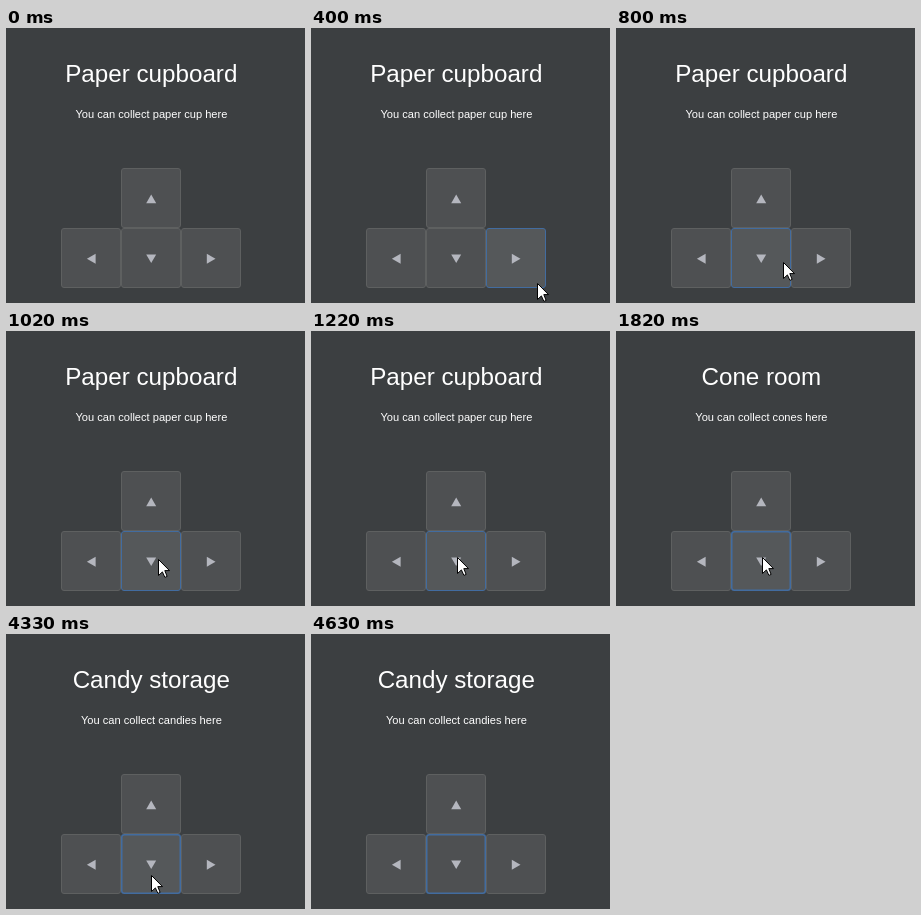
Write an HTML page with a canvas that moves like this. It is 299 by 275 pixels and loops after 5540 ms.

```html
<!DOCTYPE html>
<html lang="en">
<head>
<meta charset="utf-8">
<title>Room navigation</title>
<style>
  html, body { margin: 0; width: 100%; height: 100%; overflow: hidden; background: #3c3f41; }
  canvas { display: block; }
</style>
</head>
<body>
<canvas id="stage" width="299" height="275"></canvas>
<script>
const stage = document.getElementById('stage');
const ctx = stage.getContext('2d');
const LOOP = 5540;
const ENTER = 400, CLICK = 1820, NEXT = 3730, LEAVE = 4330;
const SIZE = 60;
const DOWN = 2;

const cursorShape = new Path2D('M.5 .5V16.5L4.4 12.9L6.9 18.4L9.1 17.4L6.8 11.6H11.5Z');
const arrowShape = new Path2D('M0 -4.3L5 4.4H-5Z');

// One button per quarter turn: up, right, down, left
const buttons = [0, 1, 2, 3].map(turn => ({
  turn,
  x: 115 + SIZE * Math.round(Math.sin(turn * Math.PI / 2)),
  y: turn ? 200 : 140,
}));

function roomAt(t) {
  if (t < CLICK) return ['Paper cupboard', 'paper cup'];
  if (t < NEXT) return ['Cone room', 'cones'];
  return ['Candy storage', 'candies'];
}

// The pointer eases in and slides out, sampled about ten times a second
function pointerAt(t) {
  if (t < ENTER) return null;
  if (t < LEAVE) {
    const step = Math.min(8, Math.floor((t - ENTER) / 102.5 + 0.1));
    const left = (1 - step / 8) ** 1.9;
    return { x: Math.round(146 + 80 * left), y: Math.round(226 + 29 * left) };
  }
  const step = Math.min(4, Math.floor((t - LEAVE) / 100) + 1);
  return { x: 146 - step, y: 226 + 15 * step };
}

function label(text, size, x, y) {
  ctx.font = `${size}px "Liberation Sans", Arial, sans-serif`;
  ctx.fillStyle = '#fff';
  ctx.textAlign = 'center';
  ctx.fillText(text, x, y);
}

function drawButton({ x, y, turn }, hovered, focused) {
  const line = focused ? 1.5 : 1;
  ctx.beginPath();
  ctx.roundRect(x + line / 2, y + line / 2, SIZE - line, SIZE - line, 2.5);
  ctx.fillStyle = hovered ? '#55585a' : '#4e5052';
  ctx.fill();
  ctx.lineWidth = line;
  ctx.strokeStyle = hovered || focused ? '#426ca0' : '#5e6060';
  ctx.stroke();

  ctx.save();
  ctx.translate(x + 30.2, y + 30.8);
  ctx.rotate(turn * Math.PI / 2);
  ctx.fillStyle = '#b4b6be';
  ctx.fill(arrowShape);
  ctx.restore();
}

function drawCursor({ x, y }) {
  ctx.save();
  ctx.translate(x, y);
  ctx.fillStyle = '#fff';
  ctx.fill(cursorShape);
  ctx.lineWidth = 1;
  ctx.lineJoin = 'round';
  ctx.strokeStyle = '#000';
  ctx.stroke(cursorShape);
  ctx.restore();
}

function draw(t) {
  const [title, item] = roomAt(t);
  const pointer = pointerAt(t);
  const inside = (start, p) => p >= start && p < start + SIZE;

  ctx.fillStyle = '#3c3f41';
  ctx.fillRect(0, 0, stage.width, stage.height);
  label(title, 24.2, 145.3, 54);
  label(`You can collect ${item} here`, 11.1, 145.4, 90);

  for (const button of buttons) {
    const hovered = pointer && inside(button.x, pointer.x) && inside(button.y, pointer.y);
    drawButton(button, hovered, button.turn === DOWN && t >= CLICK);
  }
  if (pointer) drawCursor(pointer);
}

const start = performance.now();
function tick() {
  draw((performance.now() - start) % LOOP);
  requestAnimationFrame(tick);
}
tick();
</script>
</body>
</html>
```
